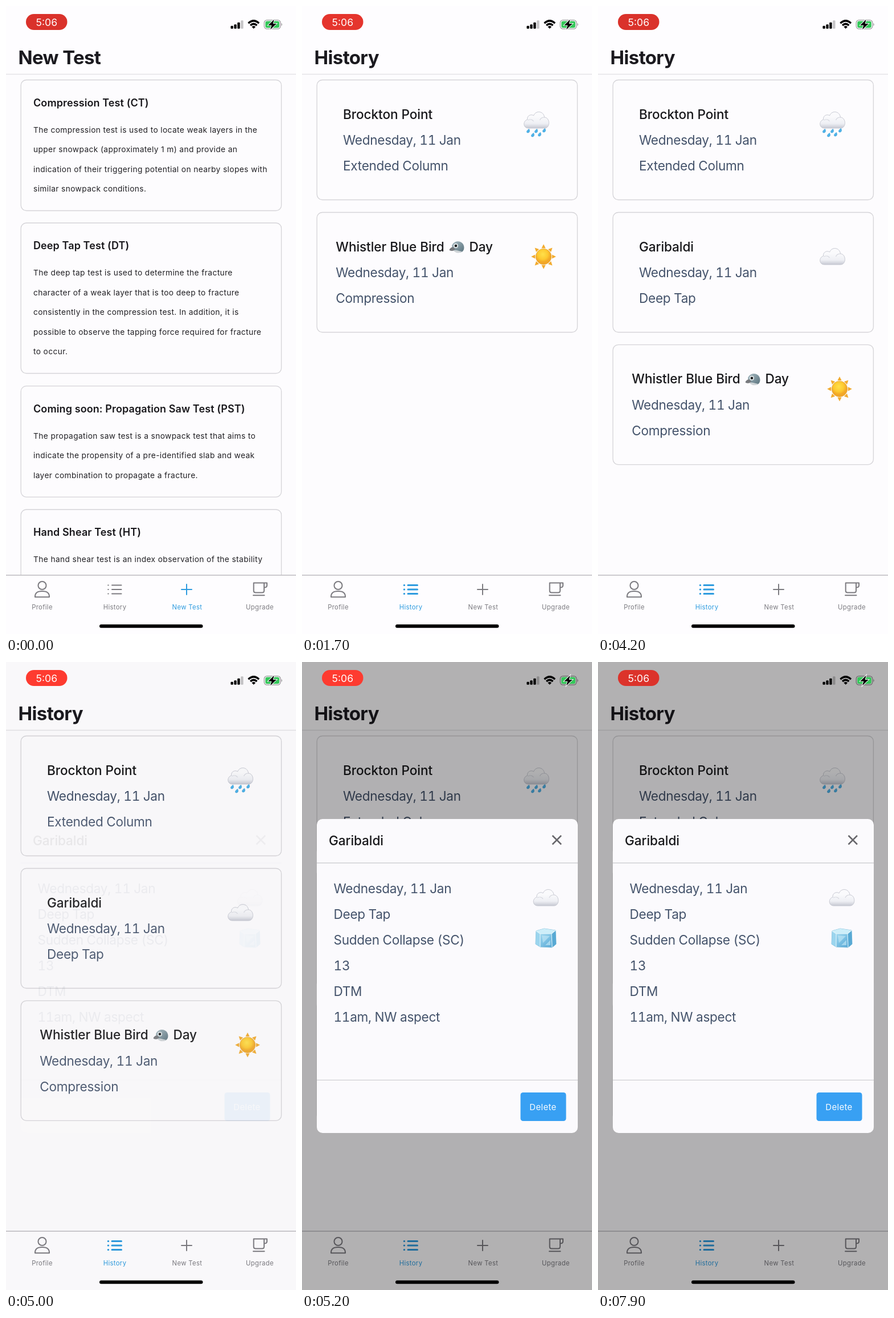
Write an HTML page that moves like this. It is 509 by 1100 pixels and loops after 8000 ms.

```html
<!DOCTYPE html>
<html lang="en">
<head>
<meta charset="utf-8">
<title>Snow tests</title>
<style>
html, body { margin: 0; width: 100%; height: 100%; overflow: hidden; background: #fdfcfe; }
svg { display: block; width: 100vw; height: 100vh; font-family: Inter, Roboto, sans-serif; }
.heading { font-size: 33px; font-weight: 700; letter-spacing: -.65px; fill: #1b1a1f; }
.card { fill: #fdfcfe; stroke: #d5d4d8; stroke-width: 1.3; }
.test { font-size: 18px; font-weight: 600; letter-spacing: .1px; fill: #18171b; }
.body { font-size: 13.75px; letter-spacing: .38px; fill: #222125; }
.name { font-size: 22.6px; font-weight: 500; letter-spacing: -.08px; fill: #18181b; }
.detail { font-size: 22.6px; letter-spacing: -.3px; font-variant-numeric: tabular-nums; fill: #44536b; }
.tab { color: #7c7b80; }
.tab.active { color: #2d9bdf; }
.tab text { font-size: 11.3px; letter-spacing: .35px; fill: currentColor; text-anchor: middle; }
.tab path { fill: none; stroke: currentColor; stroke-width: 2; stroke-linecap: round; stroke-linejoin: round; }
.tab.active .bold { stroke-width: 3; }
</style>
</head>
<body>
<svg viewBox="0 0 509 1100" preserveAspectRatio="none">
  <defs>
    <linearGradient id="cloudFill" x2="0" y2="1">
      <stop offset=".3" stop-color="#fafafc"/><stop offset=".72" stop-color="#eeeff4"/><stop offset="1" stop-color="#c6c8d2"/>
    </linearGradient>
    <radialGradient id="sunFill" cx=".45" cy=".35">
      <stop offset="0" stop-color="#ffe04a"/><stop offset=".65" stop-color="#fdc930"/><stop offset="1" stop-color="#f2a727"/>
    </radialGradient>
    <linearGradient id="birdFill" x2="1" y2="1">
      <stop offset="0" stop-color="#a9bcc3"/><stop offset="1" stop-color="#58717c"/>
    </linearGradient>
    <linearGradient id="iceFill" x2="1" y2="1">
      <stop offset="0" stop-color="#b9e5f5"/><stop offset=".5" stop-color="#83c6e6"/><stop offset="1" stop-color="#4d9fd0"/>
    </linearGradient>
    <g id="cloud">
      <path d="M-14 14C-24 14-24 1-16-1C-17-9-8-11-5-8C-1-18 13-16 14-5C24-5 25 14 14 14Z" fill="url(#cloudFill)" stroke="#c2c4ce" stroke-width=".9"/>
      <path d="M-15 0C-11-2-7-1-5 2M14-5C10-5 7-3 6 0" fill="none" stroke="#d3d5dd" stroke-width="1.1"/>
    </g>
    <path id="drop" d="M2-3.6C4 0 2.6 3 0 3C-3.4 3-2.6-1 2-3.6Z" fill="#4db4ea" stroke="#2a8cc8" stroke-width=".5"/>
    <g id="rain"><use href="#cloud" y="-7"/><g id="drops"></g></g>
    <g id="sun"><g id="rays" fill="#f2ab30"></g><circle r="13.7" fill="url(#sunFill)" stroke="#e3a034" stroke-width=".7"/></g>
    <g id="bird">
      <path d="M-9-2C-6-11 5-12 10-6C14-1 13 7 8 9C2 11-3 10-7 5Z" fill="url(#birdFill)"/>
      <path d="M-7 0C-11 1-14 4-13 6C-9 8-5 7-3 4Z" fill="#77797d"/>
      <path d="M-6 6C0 5 4 8 9 8C4 12-3 11-6 6Z" fill="#cfd4d7"/>
      <circle cx="-2" cy="-2" r="4" fill="#e3e9ea"/><circle cx="-2" cy="-2" r="2.3" fill="#151719"/>
    </g>
    <g id="ice" stroke-linejoin="round">
      <path d="M-17-13L-3-17L17-14L18 10L11 16L-10 15L-18 10Z" fill="url(#iceFill)" stroke="#83bfdc"/>
      <path d="M-17-13L-3-17L17-14L10-8L-10-8Z" fill="#cdeef9"/>
      <path d="M-10-8V15L-18 10L-17-13Z" fill="#9bd5ee"/>
      <path d="M10-8L17-14L18 10L11 16Z" fill="#58a9d4"/>
      <path d="M-7-5L7-4L-5 8ZM-1 12L8 3V12Z" fill="#c6e9f6" opacity=".6"/>
      <path d="M-17-13L-10-8H10L17-14M-10-8V15M10-8L11 16" fill="none" stroke="#e2f5fb" stroke-width="1.1"/>
    </g>
  </defs>

  <rect width="509" height="1100" fill="#fdfcfe"/>
  <g id="tests"></g>
  <g id="history"></g>
  <rect width="509" height="119" fill="#fefdff"/>
  <path d="M0 119.5H509" stroke="#e3e2e5" stroke-width="1.3"/>
  <text id="heading" class="heading" x="21.5" y="102"></text>
  <rect y="997" width="509" height="103" fill="#fefdff"/>
  <path d="M0 997H509" stroke="#bcbbbf" stroke-width="1.5"/>
  <g id="tabs"></g>

  <rect id="backdrop" width="509" height="1100" opacity="0"/>
  <g id="modal" opacity="0"></g>

  <rect id="pill" x="35" y="14" width="72.5" height="28" rx="14"/>
  <text x="71.3" y="34.5" font-size="17.6" fill="#fff" text-anchor="middle">5:06</text>
  <g id="signal"></g>
  <g fill="none" stroke="#000" stroke-width="3.4">
    <path d="M425.4 30.2Q434.7 21.6 444 30.2M429 34Q434.7 28.8 440.4 34"/>
    <path d="M431.4 36.4Q434.7 33.6 438 36.4L434.7 39.8Z" fill="#000" stroke="none"/>
  </g>
  <rect x="453.2" y="24.6" width="28.6" height="15.6" rx="5" fill="none" stroke="#000" stroke-opacity=".38" stroke-width="1.3"/>
  <path d="M483.4 29.7Q486 32.4 483.4 35.1Z" fill="#000" fill-opacity=".42"/>
  <rect x="455.2" y="26.6" width="24.6" height="11.6" rx="3.2" fill="#34c759"/>
  <path d="M470.6 23.5L460.2 33.7H466.2L464 41.3L474.8 31H468.7Z" fill="#000" stroke="#fefdff" stroke-width="1.8" paint-order="stroke"/>
  <rect x="164" y="1083.2" width="181.5" height="6" rx="3"/>
</svg>

<script>
const LOOP = 8000, OPEN_HISTORY = 1400, ADD_ENTRY = 2200, OPEN_MODAL = 4991, FADE = 147;
const $ = id => document.getElementById(id);
const text = (cls, x, y, s) => `<text class="${cls}" x="${x}" y="${y}">${s}</text>`;
const lines = (cls, x, y, step, list) => list.map((s, i) => text(cls, x, y + i * step, s)).join('');
const use = (id, x, y) => `<use href="#${id}" x="${x}" y="${y}"/>`;
const card = (y, h) => `<rect class="card" x="26.2" y="${y}" width="457.2" height="${h}" rx="9.5"/>`;

const testCard = (y, h, title, body) =>
  card(y, h) + text('test', 48, y + 46, title) + lines('body', 48, y + 92, 34.55, body);

$('tests').innerHTML =
  testCard(129.5, 229, 'Compression Test (CT)', [
    'The compression test is used to locate weak layers in the',
    'upper snowpack (approximately 1 m) and provide an',
    'indication of their triggering potential on nearby slopes with',
    'similar snowpack conditions.']) +
  testCard(380, 263.5, 'Deep Tap Test (DT)', [
    'The deep tap test is used to determine the fracture',
    'character of a weak layer that is too deep to fracture',
    'consistently in the compression test. In addition, it is',
    'possible to observe the tapping force required for fracture',
    'to occur.']) +
  testCard(665.6, 194.5, 'Coming soon: Propagation Saw Test (PST)', [
    'The propagation saw test is a snowpack test that aims to',
    'indicate the propensity of a pre-identified slab and weak',
    'layer combination to propagate a fracture.']) +
  testCard(882, 230, 'Hand Shear Test (HT)', [
    'The hand shear test is an index observation of the stability']);

const DATE = 'Wednesday, 11 Jan';
const entry = (y, x, name, kind, icon, iconX) =>
  card(y, 210) + text('name', x, y + 68, name) +
  lines('detail', x, y + 113.5, 45.1, [DATE, kind]) + use(icon, iconX, y + 77.5);

$('history').innerHTML =
  entry(129.5, 72, 'Brockton Point', 'Extended Column', 'rain', 411.5) +
  `<g id="added">${entry(361.5, 72, 'Garibaldi', 'Deep Tap', 'cloud', 411.5)}</g>` +
  `<g id="oldest">${entry(361.5, 59.3, 'Whistler Blue Bird', 'Compression', 'sun', 424)}
    ${use('bird', 272, 422)}${text('name', 293.5, 429.5, 'Day')}</g>`;

$('modal').innerHTML = `
  <rect x="26" y="275" width="458" height="550" rx="10" fill="#fbfafd"/>
  <path d="M26 352H484M26 732.4H484" stroke="#d0cfd3" stroke-width="1.4"/>
  ${text('name', 47, 321, 'Garibaldi')}
  <path d="M439.5 304L455 319.5M455 304L439.5 319.5" stroke="#68676c" stroke-width="2.5"/>
  ${lines('detail', 55.5, 404.5, 45.15, [DATE, 'Deep Tap', 'Sudden Collapse (SC)', '13', 'DTM', '11am, NW aspect'])}
  ${use('cloud', 428, 413)}${use('ice', 428, 484)}
  <rect x="383.5" y="754" width="80" height="50" rx="4.5" fill="#38a0f3"/>
  <text x="423" y="784.5" font-size="15" letter-spacing=".3" fill="#f7fbff" text-anchor="middle">Delete</text>`;

const tabs = [
  ['Profile', 63.5, 'M56.5 1015A6.8 6.8 0 1 1 70.5 1015A7 7 0 1 1 56.5 1015ZM51 1035.3Q50.5 1025 63.5 1025Q76.5 1025 76 1035.3Z'],
  ['History', 191, 'M179.2 1014.5H179.7M179.2 1022H179.7M179.2 1029.5H179.7M186 1014.5H202.5M186 1022H202.5M186 1029.5H202.5', 'bold'],
  ['New Test', 318, 'M308 1022H326M317 1013V1031'],
  ['Upgrade', 445.5, 'M434.7 1010.5H453V1024Q453 1027.5 449.5 1027.5H438Q434.7 1027.5 434.7 1024ZM453 1010.5H458V1015Q458 1018.5 453 1018.5M434 1032.3H453.5'],
];
$('tabs').innerHTML = tabs.map(([label, x, icon, weight = '']) =>
  `<g class="tab"><path class="${weight}" d="${icon}"/><text x="${x}" y="1057">${label}</text></g>`).join('');

$('rays').innerHTML = Array.from({ length: 8 }, (_, i) =>
  `<path d="M-3.6-14.8L0-21.8L3.6-14.8Z" transform="rotate(${i * 45})"/>`).join('');
$('drops').innerHTML = [[-15, 12], [-1, 12], [13, 11], [-7, 19], [5, 18]].map(([x, y]) => use('drop', x, y)).join('');
$('signal').innerHTML = [5, 7.5, 11, 14.5].map((h, i) =>
  `<rect x="${394.4 + i * 5.9}" y="${39.8 - h}" width="4.4" height="${h}" rx="1.2" fill-opacity="${i < 3 ? 1 : .22}"/>`).join('');

const show = (id, on) => $(id).setAttribute('display', on ? 'inline' : 'none');
const tabNodes = document.querySelectorAll('.tab');

function render(t) {
  const onHistory = t >= OPEN_HISTORY, hasEntry = t >= ADD_ENTRY;
  show('tests', !onHistory);
  show('history', onHistory);
  show('added', hasEntry);
  $('oldest').setAttribute('transform', `translate(0 ${hasEntry ? 231.8 : 0})`);
  $('heading').textContent = onHistory ? 'History' : 'New Test';
  tabNodes.forEach((node, i) => node.classList.toggle('active', i === (onHistory ? 1 : 2)));

  const fade = Math.min(1, Math.max(0, (t - OPEN_MODAL) / FADE));
  $('backdrop').setAttribute('opacity', .3 * fade);
  $('modal').setAttribute('opacity', fade);

  // The recording pill breathes once every two seconds.
  const glow = .5 - .5 * Math.cos((t - 80) / 1000 * Math.PI);
  $('pill').setAttribute('fill', `rgb(${217 + 38 * glow},${50 + 9 * glow},${43 + 5 * glow})`);
}

const start = performance.now();
function tick() {
  render((performance.now() - start) % LOOP);
  requestAnimationFrame(tick);
}
tick();
</script>
</body>
</html>
```
